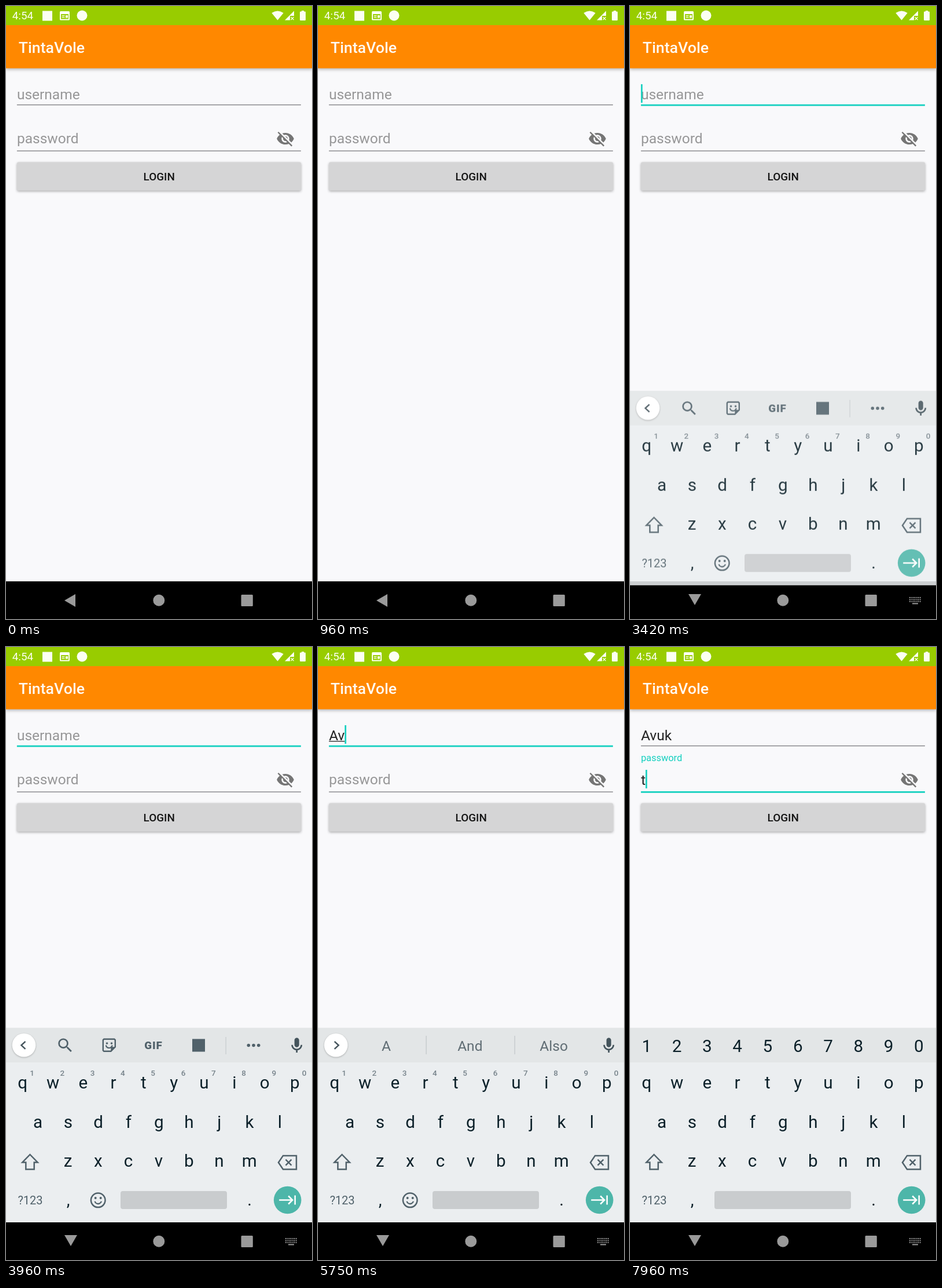
Animation, 529 px wide and 1058 px high, one loop 8 s. Source, as an HTML page with a canvas:

```html
<!DOCTYPE html>
<html lang="en">
<head>
<meta charset="utf-8">
<title>Login form</title>
<style>
  html, body { margin: 0; width: 100%; height: 100%; overflow: hidden; background: #f9f9fb; }
  canvas { display: block; width: 529px; height: 1058px; }
</style>
</head>
<body>
<canvas id="stage" width="529" height="1058"></canvas>
<script>
const W = 529, H = 1058, LOOP = 8000, DP = 1.347;
const FONT = 'Roboto, "Open Sans", sans-serif';
const TEAL = '#14d0bf', INK = '#0b2029', SLATE = '#50616a';
const USER = 'Avuk', LEFT = 18.9, FIELD = 24.5;

// Moments of the scenario, in ms
const FOCUS = 3260, BLINK = 3290, SLIDE = 3298, SLIDE_MS = 250;
const TYPED = [5330, 5690, 6010, 6330], NEXT = 6850, PASS_KEY = 7800;

const screen = document.getElementById('stage').getContext('2d');
const sheet = document.createElement('canvas');
sheet.width = W;
sheet.height = H;
const board = sheet.getContext('2d');
let c = screen;

const EYE_OFF = new Path2D('M12 7c2.76 0 5 2.24 5 5 0 .65-.13 1.26-.36 1.83l2.92 2.92c1.51-1.26 2.7-2.89 3.43-4.75-1.73-4.39-6-7.5-11-7.5-1.4 0-2.74.25-3.98.7l2.16 2.16C10.74 7.13 11.35 7 12 7zM2 4.27l2.74 2.74C3.08 8.3 1.78 10.02 1 12c1.73 4.39 6 7.5 11 7.5 1.55 0 3.03-.3 4.38-.84L19.73 22 21 20.73 3.27 3zM7.53 9.8l1.55 1.55c-.05.21-.08.43-.08.65 0 1.66 1.34 3 3 3 .22 0 .44-.03.65-.08l1.55 1.55c-.67.33-1.41.53-2.2.53-2.76 0-5-2.24-5-5 0-.79.2-1.53.53-2.2zm4.31-.78l3.15 3.15.02-.16c0-1.66-1.34-3-3-3z');
const SEARCH = new Path2D('M15.5 14h-.79l-.28-.27A6.47 6.47 0 0 0 16 9.5 6.5 6.5 0 1 0 9.5 16c1.61 0 3.09-.59 4.23-1.57l.27.28v.79l5 4.99L20.49 19zm-6 0A4.5 4.5 0 1 1 14 9.5 4.5 4.5 0 0 1 9.5 14z');
const MIC = new Path2D('M12 14c1.66 0 3-1.34 3-3V5c0-1.66-1.34-3-3-3S9 3.34 9 5v6c0 1.66 1.34 3 3 3zm5-3c0 2.76-2.24 5-5 5s-5-2.24-5-5H5c0 3.53 2.61 6.43 6 6.92V21h2v-3.08c3.39-.49 6-3.39 6-6.92z');

const clamp = v => Math.max(0, Math.min(1, v));
const mix = (a, b, k) => a + (b - a) * k;
const smooth = k => k * k * (3 - 2 * k);

function rect(x, y, w, h, color, r = 0) {
  c.fillStyle = color;
  c.beginPath();
  c.roundRect(x, y, w, h, r);
  c.fill();
}

function disc(x, y, r, color) {
  c.fillStyle = color;
  c.beginPath();
  c.arc(x, y, r, 0, Math.PI * 2);
  c.fill();
}

function text(str, x, y, size, color, align = 'left', weight = 400) {
  c.font = `${weight} ${size}px ${FONT}`;
  c.textAlign = align;
  c.fillStyle = color;
  c.fillText(str, x, y);
}

function icon(path, x, y, color) {
  c.save();
  c.translate(x - 12 * DP, y - 12 * DP);
  c.scale(DP, DP);
  c.fillStyle = color;
  c.fill(path, 'evenodd');
  c.restore();
}

// Points are [x, y] pairs relative to (x, y)
function trace(x, y, pts, close) {
  c.beginPath();
  pts.forEach(([dx, dy]) => c.lineTo(x + dx, y + dy));
  if (close) c.closePath();
}

function line(x, y, pts, color, width, close = false) {
  trace(x, y, pts, close);
  c.strokeStyle = color;
  c.lineWidth = width;
  c.stroke();
}

function poly(x, y, pts, color) {
  trace(x, y, pts, true);
  c.fillStyle = color;
  c.fill();
}

function arc(x, y, r, from, to, color, width) {
  c.beginPath();
  c.arc(x, y, r, from, to);
  c.strokeStyle = color;
  c.lineWidth = width;
  c.stroke();
}

function shadowed(blur, dy, alpha, draw) {
  c.save();
  c.shadowColor = `rgba(0,0,0,${alpha})`;
  c.shadowBlur = blur;
  c.shadowOffsetY = dy;
  draw();
  c.restore();
}

function statusBar() {
  const green = '#98cc00', white = '#fcfff2';
  rect(0, 0, W, 33, green);
  text('4:54', 10.8, 23.4, 18.8, white);
  rect(63, 8.5, 17, 17, white);
  rect(93, 9, 17, 15.5, white, 1.5);
  rect(95, 14, 13, 8.5, green);
  rect(96.5, 16, 5, 1.4, white);
  rect(96.5, 18.8, 5, 1.4, white);
  rect(103, 16, 4, 4.5, white);
  disc(131.5, 16.5, 9, white);

  c.beginPath();
  c.moveTo(469.5, 24.5);
  c.lineTo(459.3, 12);
  c.quadraticCurveTo(469.5, 4.8, 479.7, 12);
  c.fillStyle = white;
  c.fill();

  poly(482, 24.5, [[0, 0], [16, 0], [16, -16]], white);
  rect(491, 17, 7.5, 8, green);
  line(492.5, 19, [[0, 0], [5, 5]], white, 1.3);
  line(492.5, 24, [[0, 0], [5, -5]], white, 1.3);
  rect(508, 9.5, 10, 15.5, white, 1.3);
  rect(511, 8, 4, 2, white);
}

function caret(x, y) {
  rect(x, y, 2.7, 32, TEAL);
}

function form(t) {
  const count = TYPED.filter(m => t >= m).length;
  const user = USER.slice(0, count);
  const inPass = t >= NEXT, inUser = t >= FOCUS && !inPass;
  const last = [BLINK, ...TYPED, NEXT, PASS_KEY].filter(m => t >= m).pop();
  const caretOn = (t - (last ?? t)) % 1000 < 500;

  if (user) text(user, LEFT, 160.5, FIELD, '#222');
  else text('username', LEFT, 160.5, FIELD, '#979798');
  c.font = `400 ${FIELD}px ${FONT}`;
  const userW = c.measureText(user).width;
  if (inUser) {
    rect(LEFT, 169.7, 491, 2.8, TEAL);
    if (user) rect(LEFT, 162, userW, 1.4, '#333');
    if (caretOn) caret(LEFT + userW, 135);
  } else {
    rect(LEFT, 170, 491, 1.3, '#77777b');
  }

  // The hint shrinks into a floating label
  const k = smooth(clamp((t - NEXT) / 167));
  const tint = `rgb(${mix(151, 20, k)},${mix(151, 208, k)},${mix(152, 191, k)})`;
  text('password', LEFT, mix(236.5, 197.3, k), mix(FIELD, 16.4, k), tint);
  if (inPass) {
    const typed = t >= PASS_KEY ? 't' : '';
    text(typed, LEFT, 237.7, FIELD, '#222');
    if (caretOn) caret(LEFT + c.measureText(typed).width, 212);
    rect(LEFT, 249, 491, 2.8, TEAL);
  } else {
    rect(LEFT, 249.4, 491, 1.3, '#77777b');
  }
  icon(EYE_OFF, 483, 229, '#757575');

  shadowed(4, 1.5, .32, () => rect(19, 269.5, 491, 49, '#d5d5d6', 2.5));
  text('LOGIN', 264.7, 301.3, 18.86, '#141414', 'center', 500);
}

function app(t) {
  rect(0, 0, W, H, '#f9f9fb');
  form(t);
  shadowed(5, 2, .25, () => rect(0, 30, W, 77.5, '#ff8800'));
  statusBar();
  text('TintaVole', 21.8, 80.8, 26.7, '#fffaf2', 'left', 500);
  rect(0, 993, W, 65, '#000');
}

function chevron(dir) {
  shadowed(3, 1, .25, () => disc(31, 687.3, 20.3, '#fff'));
  line(31 + dir * 1, 687.3, [[-dir * 3.5, -6.5], [dir * 3.5, 0], [-dir * 3.5, 6.5]], '#46555d', 2.5);
}

function toolStrip() {
  chevron(-1);
  icon(SEARCH, 102.4, 687.5, SLATE);
  line(178.3, 687.3, [[-9, -10.5], [9, -10.5], [10.5, -9], [10.5, 3], [3, 10.5],
    [-9, 10.5], [-10.5, 9], [-10.5, -9]], SLATE, 2.4, true);
  poly(178.3, 687.3, [[10.5, 3], [3, 10.5], [3, 3]], SLATE);
  disc(174.5, 684, 1.8, SLATE);
  disc(182.5, 684, 1.8, SLATE);
  arc(178.3, 686.5, 5.5, .15, Math.PI - .15, SLATE, 2.2);
  c.letterSpacing = '1px';
  text('GIF', 255, 693.8, 18.8, SLATE, 'center', 900);
  c.letterSpacing = '0px';
  rect(322, 676.5, 22, 22, SLATE);
  rect(379.5, 673, 1.2, 30, '#c5cacd');
  for (let i = -1; i < 2; i++) disc(428 + i * 8.7, 687.5, 2.8, SLATE);
  icon(MIC, 502.7, 688, '#44545c');
}

function wordStrip() {
  chevron(1);
  ['A', 'And', 'Also'].forEach((word, i) =>
    text(word, 118 + i * 144.8, 697, 24.5, '#606d74', 'center'));
  rect(186.5, 671, 1.2, 32, '#c0c5c8');
  rect(339.5, 671, 1.2, 32, '#c0c5c8');
  icon(MIC, 502.7, 688, '#44545c');
}

function row(chars, x, y, size = 29.6, color = INK, weight = 400) {
  [...chars].forEach((ch, i) => text(ch, x + i * 52.3, y, size, color, 'center', weight));
}

function keyboard(t) {
  const pass = t >= NEXT + 60;
  rect(0, 658, W, 335, '#ebeef0');
  rect(0, 658, W, 59, '#e3e6e7');
  rect(0, 657, W, 1, 'rgba(0,0,0,.06)');
  rect(0, 993, W, 65, '#000');

  if (pass) row('1234567890', 28.7, 699.2);
  else {
    if (t < TYPED[0]) toolStrip(); else wordStrip();
    row('1234567890', 45, 740.3, 13.5, '#76828a', 500);
  }
  row('qwertyuiop', 28.7, 762);
  row('asdfghjkl', 55, 829.5);
  row('zxcvbnm', 107, 897.3);

  line(41.5, 889, [[0, -13], [13.2, .5], [7.2, .5], [7.2, 12.5], [-7.2, 12.5],
    [-7.2, .5], [-13.2, .5]], SLATE, 2.5, true);
  line(487, 889.7, [[-16, 0], [-8, -11.8], [15, -11.8], [15, 11.8], [-8, 11.8]], SLATE, 2.5, true);
  line(488.5, 889.7, [[-5, -5], [5, 5]], SLATE, 2.5);
  line(488.5, 889.7, [[-5, 5], [5, -5]], SLATE, 2.5);

  text('?123', 42, 962.2, 20, SLATE, 'center');
  text(',', 107.5, 964, 29, INK, 'center');
  text('.', 421, 964, 29, INK, 'center');
  const bar = pass ? 146 : 198;
  rect(bar, 939, 382 - bar, 31, '#c9ccce', 4);
  if (!pass) {
    arc(159.2, 954.8, 12.3, 0, Math.PI * 2, SLATE, 2.5);
    disc(154.7, 951, 2, SLATE);
    disc(163.7, 951, 2, SLATE);
    arc(159.2, 955, 6, .3, Math.PI - .3, SLATE, 2.3);
  }
  disc(486.7, 954.5, 23.8, '#4db6a9');
  line(486.7, 954.5, [[-14.5, 0], [8, 0]], '#fff', 2.5);
  line(486.7, 954.5, [[1.5, -7], [8.5, 0], [1.5, 7]], '#fff', 2.5);
  line(486.7, 954.5, [[13, -8], [13, 8]], '#fff', 2.5);
}

function navIcons(t) {
  const gray = '#9a9a9a';
  const k = smooth(clamp((t - FOCUS) / 150));
  c.save();
  c.translate(mix(110.5, 112, k), mix(1026, 1024.5, k));
  c.rotate(-Math.PI / 2 * k);
  poly(0, 0, [[-9.5, 0], [9.5, -11], [9.5, 11]], gray);
  c.restore();
  disc(264.3, 1025.8, 10, gray);
  rect(406.5, 1016, 20.3, 20, gray, 1.5);
  if (t < SLIDE) return;
  for (let y = 0; y < 3; y++)
    for (let x = 0; x < 6; x++) rect(483 + x * 3.5, 1020 + y * 3.4, 2, 2, gray);
  rect(488, 1030.4, 10, 2, gray);
}

function draw(t) {
  c = screen;
  app(t);
  const k = clamp((t - SLIDE) / SLIDE_MS);
  if (k > 0) {
    c = board;
    c.clearRect(0, 0, W, H);
    keyboard(t);
    c = screen;
    c.globalAlpha = 1 - (1 - k) ** 3;
    c.drawImage(sheet, 0, 200 * (1 - k) ** 5);
    c.globalAlpha = 1;
  }
  navIcons(t);
}

const start = performance.now();
function tick() {
  draw((performance.now() - start) % LOOP);
  requestAnimationFrame(tick);
}
tick();
</script>
</body>
</html>
```
